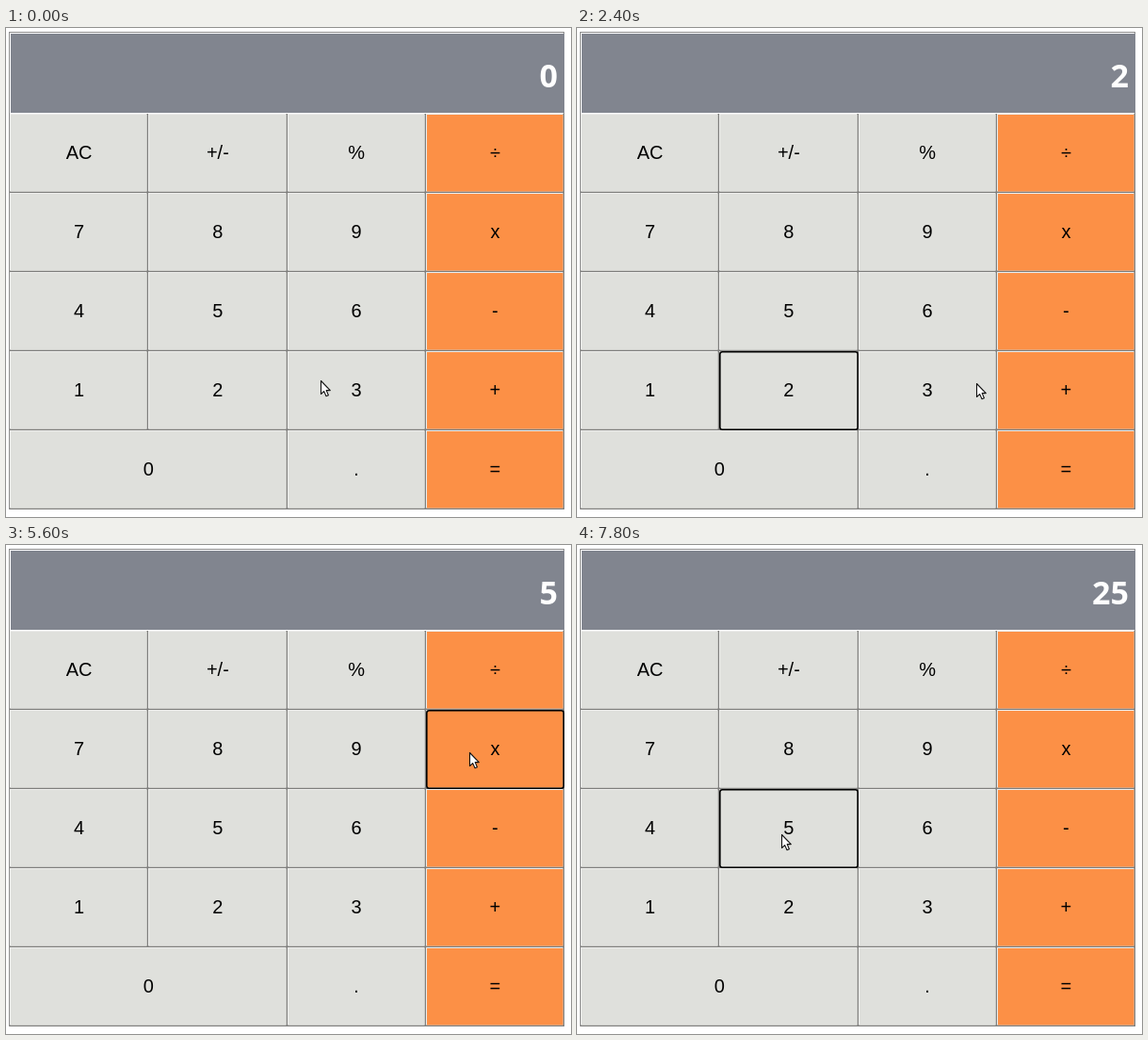
An HTML page that plays this animation: 600 px wide and 519 px high, repeating every 8000 ms.

```html
<!DOCTYPE html>
<html lang="en">
<head>
<meta charset="utf-8">
<title>Calculator</title>
<style>
  html, body { margin: 0; width: 100%; height: 100%; overflow: hidden; background: #fff; }
  svg { display: block; width: 600px; height: 519px; }
  .key { font: 20px "Liberation Sans", Arial, sans-serif; text-anchor: middle; }
  #display { font: bold 34px "Noto Sans", "Open Sans", sans-serif; text-anchor: end; fill: #fff; }
</style>
</head>
<body>
<svg viewBox="0 0 600 519">
  <rect x="3.5" y="4.5" width="589" height="506" fill="#fff" stroke="#8c8c8c"/>
  <rect x="5" y="6" width="588" height="84" fill="#81858f"/>
  <text id="display" x="586" y="62.5"></text>
  <g id="keys"></g>
  <rect id="ring" fill="none" stroke="#000" stroke-width="1.6" rx="2.5"/>
  <path id="cursor" d="M.5 .5V14.5L3.7 11.6L6 16.8L8.4 15.7L6.2 10.6H10.3Z"
        fill="#fff" stroke="#111" stroke-width="1.1" stroke-linejoin="round"/>
</svg>
<script>
const LOOP = 8000, STEP = 200, HOLD = 200;
const COL = 147.25, ROW = 84, LEFT = 4, TOP = 91;
const $ = id => document.getElementById(id);
const setAttrs = (node, attrs) => {
  for (const name in attrs) node.setAttribute(name, attrs[name]);
};

function add(name, attrs, text = '') {
  const node = document.createElementNS('http://www.w3.org/2000/svg', name);
  setAttrs(node, attrs);
  node.textContent = text;
  $('keys').append(node);
}

const keys = {};

function drawKey(label, col, row, span) {
  const edge = c => Math.round(LEFT + c * COL);
  const x = edge(col), y = TOP + row * ROW, w = edge(col + span) - x;
  const layer = (inset, trim, fill) => add('rect', {
    x: x + inset, y: y + inset, width: w - inset - trim, height: ROW - inset - trim, fill
  });
  layer(0, 0, '#7f7f7d');
  layer(0, 1.5, '#efefed');
  layer(1, 1.5, col === 3 ? '#fc9046' : '#dfe0dc');
  add('text', { class: 'key', x: LEFT + (col + span / 2) * COL, y: y + 48 }, label);
  keys[label] = { x: x + .8, y: y + .8, width: w - 1.6, height: ROW - 1.6 };
}

['AC +/- % ÷', '7 8 9 x', '4 5 6 -', '1 2 3 +', '0 . ='].forEach((line, row) => {
  let col = 0;
  for (const label of line.split(' ')) {
    const span = label === '0' ? 2 : 1;
    drawKey(label, col, row, span);
    col += span;
  }
});

// Pointer stops: a key is focused on arrival, and the value shows on release
const stops = [
  { at: 0, x: 334, y: 374, show: '0' },
  { at: 400, x: 240, y: 386, key: '2', show: '2' },
  { at: 1200, x: 508, y: 376, key: '+' },
  { at: 2000, x: 240, y: 385, key: '2' },
  { at: 2400, x: 424, y: 377 },
  { at: 2800, x: 492, y: 460, key: '=', show: '4' },
  { at: 3800, x: 456, y: 304 },
  { at: 4400, x: 236, y: 295, key: '5', show: '5' },
  { at: 5400, x: 492, y: 220, key: 'x' },
  { at: 6000, x: 235, y: 293, key: '5' },
  { at: 7000, x: 492, y: 220, key: 'x', show: '25' },
  { at: 7800, x: 217, y: 307, key: '5' }
];
const release = stop => stop.at && stop.at + HOLD;
const easeOut = k => 1 - (1 - k) ** 3;

function pointer(t) {
  const i = stops.findLastIndex(s => s.at <= t);
  const from = stops[i], to = stops[i + 1] || from;
  const leave = from.key ? release(from) : from.at;
  const k = t > leave ? easeOut((t - leave) / (to.at - leave)) : 0;
  return ['x', 'y'].map(axis => Math.round(from[axis] + (to[axis] - from[axis]) * k));
}

function render(time) {
  const t = Math.floor(time % LOOP / STEP) * STEP;
  const focused = stops.findLast(s => s.key && s.at <= t);
  $('cursor').setAttribute('transform', `translate(${pointer(t)})`);
  $('display').textContent = stops.findLast(s => s.show && release(s) <= t).show;
  $('ring').style.display = focused ? '' : 'none';
  if (focused) setAttrs($('ring'), keys[focused.key]);
}

const start = performance.now();
function tick() {
  render(performance.now() - start);
  requestAnimationFrame(tick);
}
tick();
</script>
</body>
</html>
```
